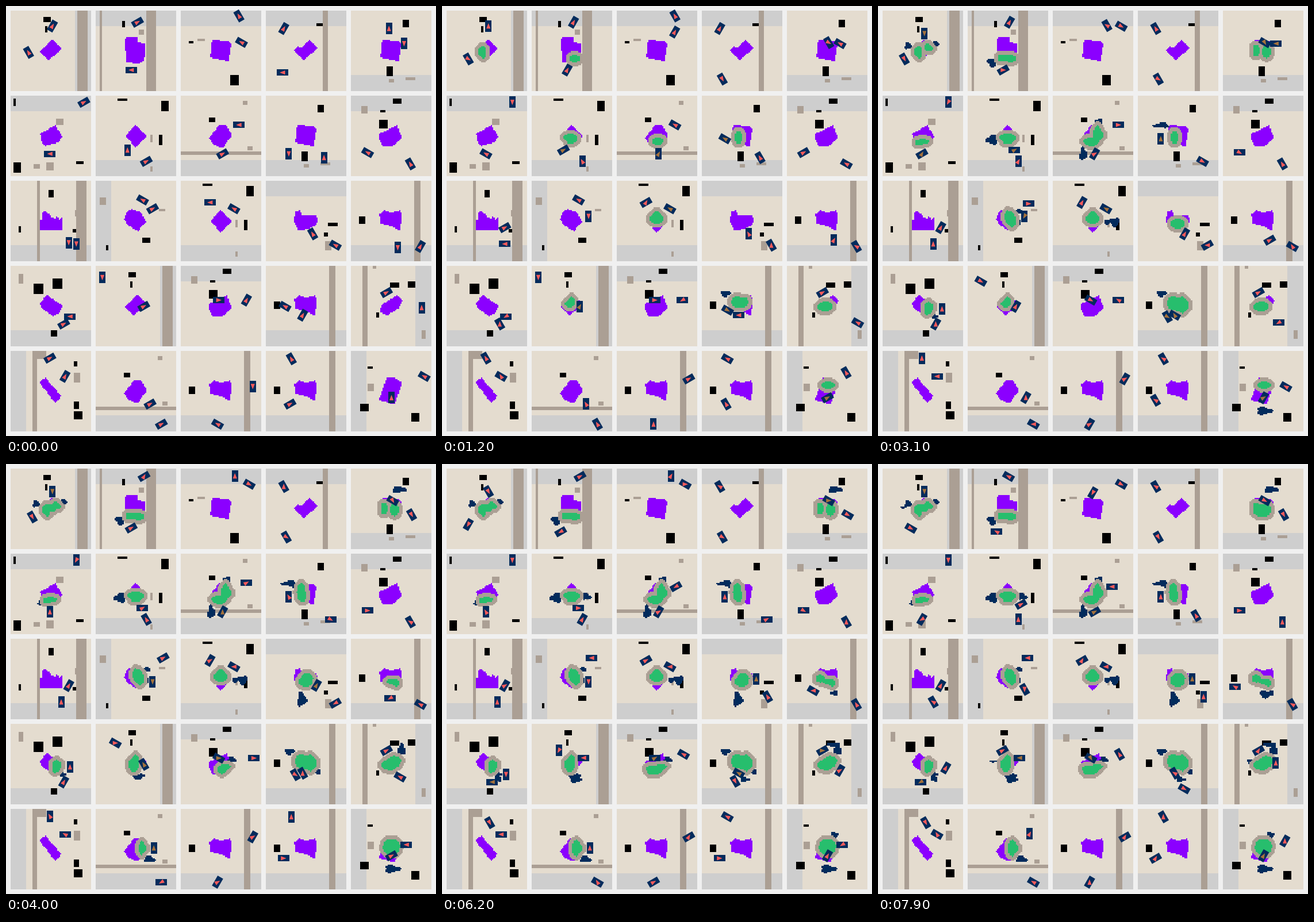
Animation, 748 px wide and 748 px high, one loop 8000 ms. Source, as a matplotlib script:

```python
import math
import random
import numpy as np
import matplotlib.pyplot as plt
from matplotlib.animation import FuncAnimation
from matplotlib.collections import PolyCollection
from matplotlib.path import Path

STAGE, PITCH, SIDE, TILES, MARGIN = 748, 148, 140, 64, 8
UNIT = SIDE / TILES
FRAMES, HOP = 80, 6
PAGE, GROUND, GREY, TAN = (240, 240, 240), (228, 220, 207), (206, 206, 206), (171, 159, 148)
BLACK, ZONE, DUG, NAVY = (0, 0, 0), (139, 0, 255), (39, 190, 109), (2, 43, 92)
EMPTY, LOADED = "#fa5a5a", "#a5713c"
BODY = [(-10, -5.5), (10, -5.5), (10, 5.5), (-10, 5.5)]
CAB = [(5, 0), (-4.5, 3.6), (-4.5, -3.6)]
BANDS = {"top": (0, 0, 64, 12), "left": (0, 0, 12, 64), "bottom": (0, 51, 64, 13), "right": (51, 0, 13, 64)}

rng = random.Random(4)
gx, gy = np.meshgrid(np.arange(TILES) + .5, np.arange(TILES) + .5)
scale = np.arange(SIDE) * TILES // SIDE
panels, machines = [], []


def polygon(flat):
    path = Path(list(zip(flat[::2], flat[1::2])))
    return path.contains_points(np.c_[gx.ravel(), gy.ravel()]).reshape(TILES, TILES)


def ellipse(x, y, rx, ry, rough=0):
    u, v = (gx - x) / rx, (gy - y) / ry
    edge = 1 + rough * np.sin(3 * np.arctan2(v, u) + rng.uniform(0, 6))
    return np.hypot(u, v) <= edge


def grow(mask, r=3):
    out = mask.copy()
    for dx in range(-r, r + 1):
        for dy in range(-r, r + 1):
            if dx * dx + dy * dy <= r * r + 1:
                out |= np.roll(mask, (dy, dx), (0, 1))
    return out


def site(zone, band=None, roads=(), tan=(), black=()):
    """Ground of one panel in tiles: a road is (x, w), a block is (x, y, w, h)."""
    ground = np.empty((TILES, TILES, 3), np.uint8)
    ground[:] = GROUND
    strips = [(x, 0, w, TILES) for x, w in roads]
    for colour, blocks in ((GREY, [BANDS[band]] if band else []), (TAN, strips + list(tan)), (BLACK, black)):
        for x, y, w, h in blocks:
            ground[y:y + h, x:x + w] = colour
    mask = polygon(zone)
    ground[mask] = ZONE
    return ground, mask


def machine(x0, y0, first_dig, x, y, heading, *drives):
    """Drives are (frame, heading[, hops]); a hop is 6 tiles, zero hops only turn.
    Headings count 30 degree steps. While idle the machine sways at random."""
    sway = swing = 0
    phase, poses = rng.randint(0, 19), []
    for n in range(FRAMES):
        for t, new, *hops in drives:
            count = hops[0] if hops else 1
            if t <= n < t + max(count, 1):
                heading, sway, swing = new, 0, 0
                if count:
                    x += HOP * math.cos(math.radians(30 * heading))
                    y -= HOP * math.sin(math.radians(30 * heading))
        if n and rng.random() < .08:
            sway = rng.choice((-1, 0, 0, 1))
        if n and rng.random() < .25:
            swing = rng.choice((-1, 0, 0, 1))
        digging = first_dig <= n and math.hypot(x - 32, y - 32) < 15
        full = digging and (n + phase) // 10 % 2 == 0
        turn = heading + sway
        poses.append((x0 + UNIT * (x + .25), y0 + UNIT * (y + .25), turn, turn + swing, full))
    machines.append(poses)


def panel(col, row, place, a, b, dig=(), dirt=()):
    """Dig and dirt patches are ellipses (frame, x, y, rx, ry)."""
    x0, y0 = MARGIN + PITCH * col, MARGIN + PITCH * row
    ground, zone = place
    holes = [(t, zone & ellipse(*e)) for t, *e in dig]
    layers = [(t, NAVY, ellipse(*e, .2)) for t, *e in dirt]
    layers += [(t, TAN, grow(m)) for t, m in holes]
    layers += [(t, DUG, m) for t, m in holes]
    panels.append((x0, y0, ground, layers))
    first = min((t for t, _ in holes), default=FRAMES)
    machine(x0, y0, first, *a)
    machine(x0, y0, first, *b)


# Sites that several panels share
ingot = site((23, 33, 32.5, 22.5, 40.5, 30, 30, 39.7), "right", [(53, 8)], black=[(26, 5, 6, 4), (27, 12, 2, 5)])
square = (24.7, 22.5, 39.3, 24.7, 39.7, 28, 37.5, 40, 23, 37, 24, 32)
yard = site(square, "bottom", tan=[(30, 54, 4, 3), (43, 53, 8, 2)], black=[(41, 7, 5, 6), (28, 44, 5, 8)])
diamond = site((23.3, 32, 31.5, 23, 40.2, 32, 31.5, 40.7), "bottom", tan=[(43, 31, 2, 6), (43, 56, 2, 4)],
               black=[(17, 2, 8, 2), (52, 4, 6, 8), (50, 31, 3, 8)])
lane = site((22.4, 33.4, 30.6, 22.4, 35.6, 23, 40.7, 31, 33, 41.6, 25.6, 38.5), "bottom",
            tan=[(0, 44, 64, 3), (49, 4, 4, 3), (53, 40, 4, 3)], black=[(22, 17, 5, 4)])
depot = site((22.4, 30, 36.6, 23.3, 40.2, 33.4, 34.7, 39.3, 25.6, 40.2, 22, 34.7), "top", tan=[(8, 8, 5, 6)],
             black=[(33, 2, 7, 4), (23, 11, 4, 2), (22, 19, 7, 7)])
lobes = site((22.4, 26.5, 26.5, 23.3, 32, 25, 39.3, 23.3, 40.2, 31, 38.4, 39.3, 31, 35.7, 23, 33.8),
             "bottom", [(50, 5)], black=[(6, 28, 5, 6)])

# Sites used once
tower = site((23, 22, 25, 21, 32.5, 21, 33, 25, 39, 26, 39, 34, 38, 40, 34, 42, 24, 41), "top",
             [(3, 2), (40, 8)], [(34, 15, 4, 4)], [(21, 8, 2, 5)])
plain = site(square, "top", tan=[(13, 22, 6, 2)], black=[(6, 24, 4, 2), (39, 51, 7, 8)])
notch = site((22, 31.5, 25.6, 28.3, 28, 29.7, 34, 23, 40.7, 29.7, 30, 39.5), "top", [(45, 4)], black=[(40, 10, 5, 2)])
tilt = site((23.3, 29.7, 35.7, 23.3, 40.7, 32.5, 37.5, 37, 27, 39.8, 24.7, 37), "top",
            tan=[(36, 18, 6, 5), (18, 54, 5, 4), (28, 53, 6, 6)], black=[(2, 2, 2, 6), (2, 53, 6, 8), (52, 52, 6, 2)])
castle = site((23, 39, 23, 30.6, 24.7, 30.6, 24.7, 26, 27, 24, 31.5, 27, 31.5, 30, 33, 28.3, 34.7, 30.6,
               36.6, 28.3, 38.4, 30.6, 40.7, 29.3, 40.7, 39), "bottom", [(21, 2), (52, 8)], [(51, 23, 2, 5)],
              [(30, 7, 4, 6), (6, 36, 2, 5), (49, 38, 3, 3)])
stone = site((22.4, 30.6, 24.2, 24.7, 28.3, 22.4, 35.7, 24.7, 39.8, 32.5, 33.4, 39.8, 25.6, 35.2), "left",
             tan=[(3, 13, 5, 6), (50, 22, 5, 2)], black=[(8, 51, 2, 4), (37, 45, 6, 4)])
boot = site((22, 32, 22.9, 24.7, 27, 23.3, 28.3, 27, 40.2, 26.5, 41, 32, 38.9, 35.7, 33.8, 38, 25.6, 39.3), "top",
            tan=[(47, 48, 5, 7)], black=[(49, 33, 8, 3), (46, 41, 3, 3)])
wedge = site((23, 29.3, 28.8, 23, 41, 31.5, 38.4, 37.5, 33.4, 39.8, 24.7, 33.8), "bottom",
             tan=[(6, 6, 4, 8)], black=[(18, 14, 8, 8), (33, 10, 8, 8), (32, 51, 5, 5)])
loaf = site((23, 36.5, 23.8, 31, 36.6, 23, 41, 27.4, 37.5, 33.8, 28.3, 39.3), "right", [(9, 4)],
            [(17, 0, 3, 2), (56, 51, 3, 7)], [(31, 13, 7, 4), (45, 12, 6, 5), (20, 37, 2, 4)])
bar = site((22.4, 24.7, 27.4, 21, 40.2, 35.7, 35.2, 41), "left", [(17, 4)], [(17, 0, 11, 6), (50, 17, 5, 8)],
           [(50, 8, 3, 4), (50, 40, 4, 6), (50, 48, 7, 6)])
slope = site((28.3, 21, 34.7, 21.5, 40.7, 24.7, 34.7, 42.5, 22, 38.8), "left", tan=[(13, 26, 5, 6)],
             black=[(13, 12, 4, 2), (7, 42, 7, 6), (48, 49, 6, 7)])

panel(0, 0, ingot, (33, 12, 2, (8, 3, 0), (18, 9)), (14, 33, 4, (6, 10), (18, 4), (28, 10), (55, 9), (70, 11)),
      dig=[(7, 28, 33, 3.5, 5.5), (28, 36.5, 29, 4, 3), (40, 32.5, 31, 4.5, 3)],
      dirt=[(18, 20, 28, 3, 2.5), (27, 42, 26, 2.5, 2), (70, 16, 31, 1.5, 1)])
panel(1, 0, tower, (33, 9, 1, (8, 2, 0), (40, 1), (70, 6)), (28, 47, 6, (8, 2, 0), (18, 1, 0), (55, 7)),
      dig=[(7, 34, 38, 4.5, 3), (27, 30, 37.5, 8, 3)], dirt=[(18, 19.5, 41, 4, 3.5)])
panel(2, 0, plain, (46, 4, 4, (15, 10), (20, 11)),
      (48, 25, 5, (4, 5), (9, 2), (27, 4), (40, 3), (66, 8), (70, 7), (74, 8)))
panel(3, 0, notch, (14, 14, 2, (18, 4, 0)), (13, 49, 6, (6, 10)))
panel(4, 0, yard, (30, 14, 3, (4, 9), (9, 10)), (42, 26, 9, (8, 5, 0), (36, 10, 2)),
      dig=[(18, 34.5, 32.5, 3.5, 5), (27, 26, 31.5, 2.8, 5), (72, 30.5, 33, 7, 5)], dirt=[(40, 38, 16.5, 5.5, 2.5)])

panel(0, 1, tilt, (58, 5, 1, (6, 6), (9, 9, 0)), (31, 46, 6, (16, 1, 0), (40, 3, 0), (70, 9)),
      dig=[(18, 31.5, 37, 6, 2.8)], dirt=[(40, 23.5, 39, 2, 2)])
panel(1, 1, diamond, (25, 43, 3, (8, 1, 0), (18, 0), (27, 0), (70, 1)), (40, 52, 1, (8, 4, 0), (27, 3, 0)),
      dig=[(7, 30.5, 34, 6, 4), (18, 31.5, 34, 6.5, 4)], dirt=[(18, 19, 35, 4.5, 3.5), (55, 43.5, 34, 3.5, 2.5)])
panel(2, 1, lane, (46, 23, 6, (28, 0), (56, 7)), (33, 46, 1, (8, 3, 0), (18, 2, 0)),
      dig=[(7, 32.5, 36, 5, 2.8), (18, 36, 30, 4, 7), (27, 30, 36.5, 6, 3.5)],
      dirt=[(18, 24, 46, 3, 5), (27, 36.5, 20.5, 3, 2.5)])
panel(3, 1, yard, (18, 46, 9, (4, 3, 2), (9, 5, 0), (27, 3, 0)), (46, 49, 3, (8, 4, 0), (27, 11), (70, 5)),
      dig=[(7, 29, 33, 3, 5.5), (40, 28, 30.5, 3.5, 7.5)], dirt=[(18, 18.5, 23.5, 6.5, 2), (40, 22, 25, 3, 2)])
panel(4, 1, depot, (13, 45, 5, (8, 1, 0), (27, 0, 0)), (47, 54, 4))

panel(0, 2, castle, (46, 49, 9, (4, 3, 2), (9, 1, 0)), (52, 50, 9, (6, 6), (16, 6), (20, 3, 0)))
panel(1, 2, stone, (37, 15, 5, (18, 11), (27, 0), (40, 1), (56, 6)), (45, 22, 1, (6, 9), (40, 9), (70, 9)),
      dig=[(18, 33, 28.5, 4, 6), (27, 35, 31, 3.5, 6)], dirt=[(18, 40, 24, 3.5, 2), (27, 40, 33, 2, 2)])
panel(2, 2, diamond, (23, 17, 6, (9, 1, 0)), (42, 22, 5),
      dig=[(7, 31.5, 29, 6, 5)], dirt=[(18, 49, 32.5, 4, 3.5), (27, 43, 33, 2, 2)])
panel(3, 2, boot, (37, 42, 4, (18, 2, 0), (40, 2, 2), (56, 3, 0)), (55, 51, 5, (8, 4, 0), (18, 6, 0), (56, 4)),
      dig=[(18, 31.5, 34, 6, 4), (40, 32.5, 31.5, 5, 4.5), (70, 31.5, 32.5, 5.5, 5.5)], dirt=[(40, 28.5, 48, 3.5, 5.5)])
panel(4, 2, lobes, (37, 53, 9, (6, 3), (18, 2, 0), (36, 6), (42, 5), (56, 5), (66, 5), (72, 6)), (55, 52, 2, (8, 4, 0)),
      dig=[(40, 33, 35, 5.5, 3.5), (56, 26, 31.5, 4, 3.2)], dirt=[(56, 37.5, 43, 3, 2), (70, 34, 44, 5, 3)])

panel(0, 3, wedge, (47, 40, 6, (18, 3), (56, 9), (70, 2)), (42, 46, 1, (8, 3, 0), (27, 2, 0), (56, 6), (70, 6)),
      dig=[(27, 36.5, 34, 4, 5.5)], dirt=[(28, 41, 40, 2.5, 2), (56, 40.5, 42.5, 2.5, 3.5)])
panel(1, 3, ingot, (5, 9, 9, (28, 11), (36, 11), (42, 0), (56, 9), (70, 0)), (38, 32, 1, (9, 3, 0), (56, 2), (58, 6, 0)),
      dig=[(7, 30, 28.5, 4, 5), (40, 30, 31, 4.5, 7)],
      dirt=[(40, 33.5, 41.5, 5, 2.5), (56, 35, 44, 4.5, 2.5), (70, 20, 29.5, 3, 1)])
panel(2, 3, depot, (30, 27, 0), (52, 27, 2, (8, 6, 0), (40, 0), (56, 5)),
      dig=[(40, 35, 36, 6, 4), (56, 30, 37, 8.5, 4.5)], dirt=[(40, 40.5, 28.5, 3.5, 2.5)])
panel(3, 3, lobes, (15, 32, 5, (6, 11), (18, 10), (56, 10), (68, 11, 2)), (29, 39, 2, (8, 5, 0)),
      dig=[(7, 30, 28.5, 7, 5), (18, 31, 29.5, 8, 6), (27, 32, 31, 8, 7.5)],
      dirt=[(7, 18.5, 22, 3.5, 2.5), (40, 40.5, 36.5, 2.5, 3.5), (56, 34, 44, 3.5, 2)])
panel(4, 3, loaf, (28, 21, 1), (56, 33, 3, (6, 9, 2), (9, 5, 0), (27, 6, 2), (40, 5), (44, 2, 0), (56, 2), (70, 3)),
      dig=[(7, 30, 32, 6.5, 4), (40, 32, 31, 8.5, 6)],
      dirt=[(40, 40, 20, 3, 4.5), (56, 37, 16.5, 5, 1.5), (70, 21.5, 29.5, 2.5, 2)])

panel(0, 4, bar, (31, 5.5, 1, (8, 4, 0), (18, 2, 0), (56, 10)), (43, 20, 2, (8, 4, 0), (20, 6, 0)))
panel(1, 4, lane, (43, 42, 1, (8, 3, 0), (18, 2), (40, 3), (66, 2), (74, 3)), (52, 58, 1, (8, 4, 0), (20, 5, 0)),
      dig=[(40, 37, 31, 2.8, 6), (56, 35.5, 31, 3.8, 6.5)], dirt=[(40, 42.5, 40, 4.5, 2.5)])
panel(2, 4, lobes, (57, 28, 9, (6, 3), (10, 1, 0)), (29, 58, 5, (8, 2, 0)))
panel(3, 4, lobes, (20, 6, 4, (8, 5, 0), (27, 4, 0)), (19, 42, 1, (8, 4, 0), (18, 5), (21, 4, 0), (40, 0, 0)))
panel(4, 4, slope, (32, 37, 3, (8, 2, 0)), (58, 20, 5, (4, 6), (9, 5), (16, 10), (20, 9), (27, 5, 0), (40, 6), (70, 1)),
      dig=[(7, 32.5, 27, 5.5, 2.8), (40, 32, 30, 7, 6.5)], dirt=[(27, 32.5, 47.5, 6, 3), (56, 37.5, 20.5, 3, 2.5)])


def place(shape, x, y, step):
    a = math.radians(30 * step)
    c, s = math.cos(a), math.sin(a)
    return [(x + c * u - s * v, y - s * u - c * v) for u, v in shape]


fig = plt.figure(figsize=(STAGE / 100, STAGE / 100), dpi=100)
ax = fig.add_axes([0, 0, 1, 1])
ax.axis("off")
canvas = np.empty((STAGE, STAGE, 3), np.uint8)
canvas[:] = PAGE
image = ax.imshow(canvas, extent=(0, STAGE, STAGE, 0), interpolation="nearest", aspect="auto")
shapes = PolyCollection([], linewidths=0)
ax.add_collection(shapes)
ax.set_xlim(0, STAGE)
ax.set_ylim(STAGE, 0)
navy = "#%02x%02x%02x" % NAVY


def draw(n):
    for x0, y0, ground, layers in panels:
        tiles = ground.copy()
        for t, colour, mask in layers:
            if t <= n:
                tiles[mask] = colour
        canvas[y0:y0 + SIDE, x0:x0 + SIDE] = tiles[np.ix_(scale, scale)]
    image.set_data(canvas)
    verts, colours = [], []
    for poses in machines:
        x, y, turn, cab, full = poses[n]
        verts += [place(BODY, x, y, turn), place(CAB, x, y, cab)]
        colours += [navy, LOADED if full else EMPTY]
    shapes.set_verts(verts)
    shapes.set_facecolor(colours)
    return image, shapes


anim = FuncAnimation(fig, draw, frames=FRAMES, interval=100, repeat=True)
plt.show()
```
